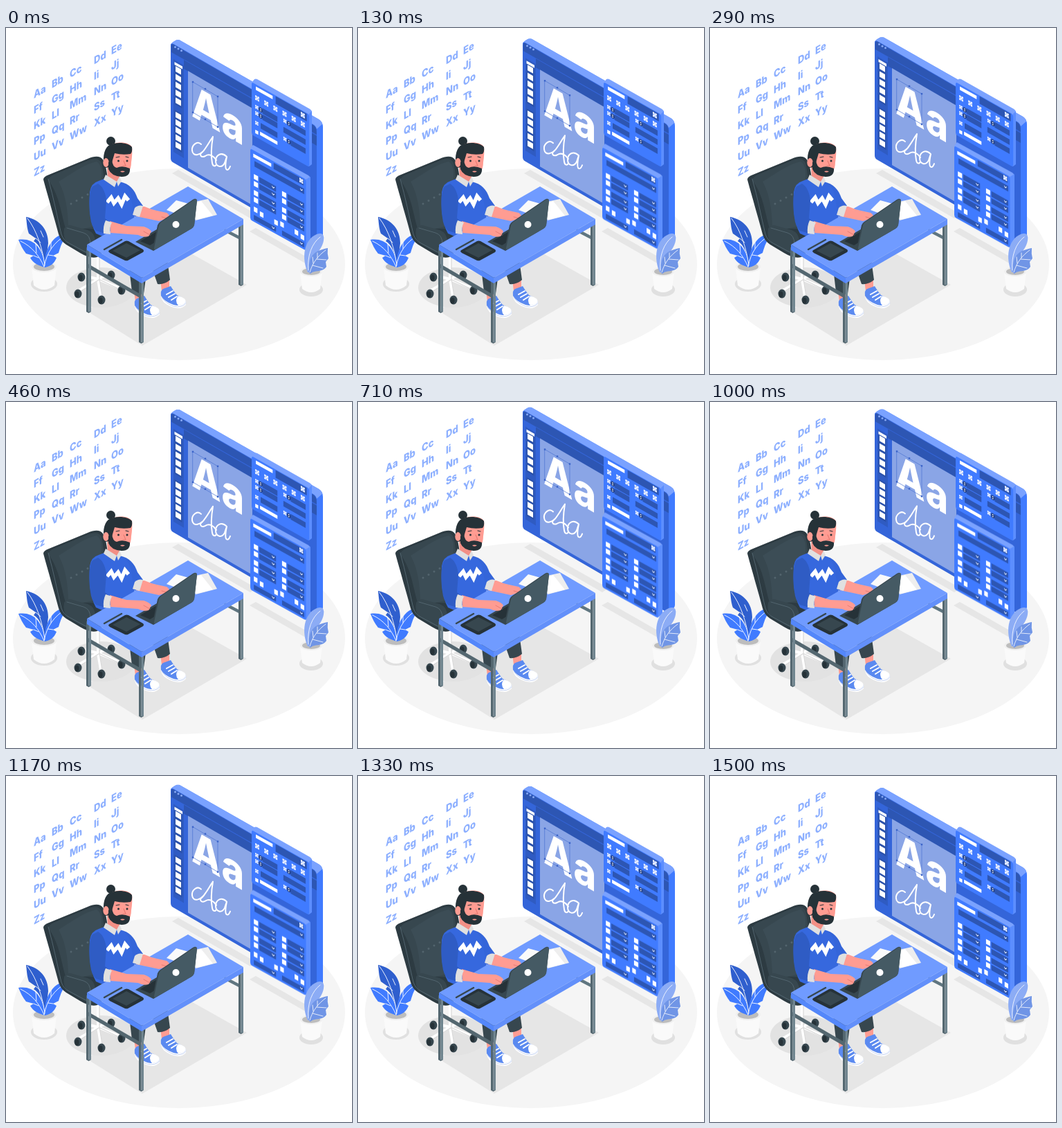
These frames come from a looping animation (500 px wide and 500 px high, 1540 ms). An HTML page:

```html
<!DOCTYPE html>
<html lang="en">
<head>
<meta charset="utf-8">
<title>Typeface designer at work</title>
<style>
html, body { margin: 0; width: 100%; height: 100%; overflow: hidden; background: #fff; }
svg { display: block; width: 100vw; height: 100vh; }
text { font-family: Inter, "Open Sans", sans-serif; font-weight: 800; }
.float { animation: float 1540ms linear infinite; }
@keyframes float {
  0%, 97.4%, 100% { transform: translateY(0); }
  48.7% { transform: translateY(-10px); }
}
.line { fill: none; stroke-linecap: round; stroke-linejoin: round; }
</style>
</head>
<body>
<svg viewBox="0 0 500 500">
  <!-- floor and shadows -->
  <ellipse cx="250" cy="341.500" rx="240" ry="138.500" fill="#f5f5f5"/>
  <g fill="#e6e6e6">
    <path d="M117 409L243 312 348 371 197 459Z"/>
    <ellipse cx="137" cy="375" rx="50" ry="29" fill="#e2e2e2"/>
    <path d="M240 210L249 205 362 269 353 275Z"/>
    <path d="M352 294L361 289 452 341 443 346Z"/>
    <ellipse cx="55" cy="370" rx="19" ry="11" fill="#e0e0e0"/>
    <ellipse cx="441" cy="378" rx="17" ry="10" fill="#e0e0e0"/>
  </g>

  <g id="alphabet" fill="#8cafff" font-size="15"></g>

  <!-- big screen -->
  <g class="float">
    <path d="M238 24Q239 21 247 17L250 17 452 132Q458 136 458 143V303Q458 308 449 313L436 300Z" fill="#407bff"/>
    <path d="M238 24Q239 21 247 17L250 17 452 132Q457 135 457 139L449 146 243 25Z" fill="#7aa2ff"/>
    <path d="M238 26Q238 21 242 23L445 140Q449 143 449 148V309Q449 315 444 312L241 194Q238 192 238 188Z" fill="#3465d9"/>
    <path d="M239 25Q239 22 242 24L445 141Q449 144 449 154L239 35Z" fill="#2d56b3"/>
    <path d="M257 46L449 156V170L257 59Z" fill="#2d56b3"/>
    <path d="M242 45L257 54V188L242 179Z" fill="#2f5bc2"/>
    <path d="M263 62L356 116V256L263 202Z" fill="#8aa5e6"/>
    <g id="dots" fill="#86a8f5"></g>
    <g id="tools"></g>
    <text transform="matrix(.866 .5 0 1 268 127)" font-size="64" letter-spacing="1" fill="#fff">Aa</text>
    <path class="line" d="M270 78L306 99V143L270 122Z" stroke="#4d74d2" stroke-width=".7"/>
    <g id="grips"></g>
    <g class="line" stroke="#fff" stroke-width="2">
      <path d="M282 168C276 162 268 170 269 177C270 187 282 184 288 174C293 167 296 161 299 157C297 169 296 185 298 195C299 201 303 200 304 197"/>
      <path d="M284 179C278 183 282 188 288 185C294 181 300 185 304 191"/>
      <path d="M319 186C311 178 303 184 303 192C303 201 312 203 316 195L319 186C317 196 316 205 320 205Q322 205 324 200"/>
    </g>
  </g>

  <!-- upper palette -->
  <path d="M355 79L359 74Q361 73 363 74L439 117Q442 119 442 121V196L437 200Z" fill="#7aa2ff"/>
  <path d="M438 124L442 120V197L438 200Z" fill="#5c8eff"/>
  <g id="upper" transform="matrix(.866 .488 0 1 355 78)"></g>

  <!-- lower palette -->
  <g class="float">
    <path d="M353 174L357 169 437 213Q440 215 440 218V316L433 321Z" fill="#7aa2ff"/>
    <path d="M433 219L440 215V316L433 321Z" fill="#5c8eff"/>
    <g id="lower" transform="matrix(.866 .48 0 1 353 174)"></g>
  </g>

  <!-- right plant -->
  <path d="M425 352L428 377Q441 387 454 377L457 352Z" fill="#fafafa"/>
  <ellipse cx="441" cy="352" rx="16" ry="7" fill="#f0f0f0"/>
  <ellipse cx="441" cy="352" rx="13" ry="5" fill="#bdbdbd"/>
  <path d="M436 353C427 333 430 306 449 298Q461 294 459 307C456 325 440 328 439 353Z" fill="#8cacf5"/>
  <path d="M438 354C436 329 445 322 465 318Q464 326 466 333L462 338 463 345C457 354 446 349 440 355Z" fill="#7095e6"/>
  <g class="line" stroke="#fff" stroke-width=".8">
    <path d="M437 350C435 329 442 311 454 302"/>
    <path d="M439 353C443 339 451 329 462 321M444 340L443 331M450 332L450 325M443 343L458 347M449 334L463 335"/>
  </g>

  <!-- left plant -->
  <path d="M37 345L40 372Q55 384 70 372L73 345Z" fill="#fafafa"/>
  <ellipse cx="55" cy="345" rx="18" ry="8" fill="#f0f0f0"/>
  <ellipse cx="55" cy="345" rx="15" ry="6" fill="#bdbdbd"/>
  <path d="M29 273C49 277 61 291 61 311L57 345C54 326 49 313 40 308L43 304 33 297C30 288 30 281 29 273Z" fill="#2f5fce"/>
  <path d="M18 306C39 303 53 316 57 346C48 344 39 340 35 332L40 329 29 326C24 320 21 313 18 306Z" fill="#407bff"/>
  <path d="M90 297C70 297 56 315 55 346C64 345 70 340 73 332L68 329 76 325C79 315 82 306 90 297Z" fill="#407bff"/>
  <g class="line" stroke="#fff" stroke-width=".9">
    <path d="M56 343C53 320 45 293 31 275M50 310L43 304M54 302L50 293"/>
    <path d="M55 345C48 329 38 316 21 308M47 332L40 329M44 325L43 312"/>
    <path d="M55 345C59 324 69 310 87 299M61 328L68 329M65 319L65 309"/>
  </g>

  <!-- chair -->
  <g class="line" stroke="#fff" stroke-width="4">
    <path d="M133 329V363L109 357M133 363L106 379M133 363L137 387M133 363L165 376M133 363L151 354"/>
  </g>
  <path class="line" d="M135 331V363L139 388M134 364L107 381M136 364L165 378" stroke="#d8d8d8" stroke-width="1.200"/>
  <g id="casters"></g>
  <path d="M54 219Q54 215 62 212L118 189Q134 182 140 190C145 198 146 212 148 224L158 306 132 331Q122 334 107 325L87 313Q79 308 76 298C70 275 61 245 54 219Z" fill="#2d3b42"/>
  <path d="M61 220Q62 215 69 212L120 191Q134 186 138 195C144 218 142 252 146 291L86 289C80 272 78 242 61 220Z" fill="#37474f"/>
  <path d="M76 222C93 212 112 197 131 193Q139 198 138 215L128 286Q104 294 90 286C89 264 87 242 76 222Z" fill="#3c4d56"/>
  <path d="M84 290Q88 283 97 286L118 292Q129 296 129 309V328Q119 328 106 321L88 310Q82 302 84 290Z" fill="#37474f"/>
  <path class="line" d="M61 218C69 246 74 273 80 298Q83 307 91 311L121 327M88 289L112 296Q122 299 122 312" stroke="#52656f" stroke-width="1"/>
  <g id="buttons" fill="#53656e"></g>

  <!-- legs and shoes -->
  <path d="M185 380H199V396H187ZM223 364H236V380H225Z" fill="#ff9c92"/>
  <path d="M178 347L202 362 199 384Q190 387 182 381Z" fill="#37474f"/>
  <path d="M211 347L233 335 237 364Q229 371 219 370Z" fill="#37474f"/>
  <g id="shoes"></g>

  <!-- torso -->
  <path d="M164 222C179 225 186 234 190 246L198 257 188 273 172 268Z" fill="#3465d9"/>
  <path d="M134 221Q147 214 164 222C176 227 180 235 181 247L186 275 151 306 130 297C121 281 120 258 121 237Q123 224 134 221Z" fill="#3668de"/>
  <path d="M146 252L152 245 156 253 162 246 167 255 172 243 177 249" fill="none" stroke="#fff" stroke-width="5.500"/>
  <path d="M146 202L164 207V219Q158 227 147 217Z" fill="#f28f85"/>
  <path d="M144 212L160 222 157 230 141 219ZM160 222L164 215 167 221 162 229Z" fill="#e0e0e0"/>

  <!-- head -->
  <circle cx="151.500" cy="163.500" r="6.500" fill="#263238"/>
  <path d="M143 181C143 166 174 160 182 172Q183 181 181 194C181 206 175 214 166 214Q149 212 145 200Z" fill="#ff9c92"/>
  <path d="M143 202C139 190 141 176 148 170C159 164 175 165 182 172Q183 179 180 182Q168 184 157 181L154 191 151 201Z" fill="#263238"/>
  <ellipse cx="144.500" cy="194.500" rx="4.200" ry="6.500" fill="#ff9c92"/>
  <path d="M148 194L153 190Q154 201 160 202Q168 198 179 203Q180 215 167 215Q152 214 148 204Z" fill="#263238"/>
  <path d="M165 207Q168 206 172 207Q168 210 165 207Z" fill="#ff9c92"/>
  <path class="line" d="M170 192L173 199 169 199" stroke="#e87b73" stroke-width="1.200"/>
  <path class="line" d="M159 187L164 186M173 186L177 187" stroke="#263238" stroke-width="1.200"/>
  <g fill="#263238"><circle cx="162.500" cy="192" r="1.500"/><circle cx="175" cy="192" r="1.500"/></g>

  <!-- desk -->
  <g>
    <path d="M315 289L338 301V306L315 294Z" fill="#607680"/>
    <path d="M119 341L195 385V391L119 347Z" fill="#546770"/>
    <g id="posts"></g>
    <path d="M117 313L263 229 343 276 196 361Z" fill="#709bff"/>
    <path d="M117 313L196 361V369L117 321Z" fill="#5487fa"/>
    <path d="M196 361L343 276V284L196 369Z" fill="#6390fa"/>
  </g>
  <path d="M232 263L246 249 275 257 256 272Z" fill="#fafafa"/>
  <path d="M264 253L292 247 305 270 274 278Z" fill="#eee"/>
  <path d="M257 259L282 250 299 271 276 277Z" fill="#fff"/>
  <path class="line" d="M142 320L167 306" stroke="#37474f" stroke-width="2.500"/>
  <path d="M148 323Q148 321 151 320L172 308Q174 307 177 308L198 320Q200 322 198 324L176 336Q173 337 170 335L150 325Z" fill="#263238"/>
  <path d="M154 322L174 311 194 321 174 332Z" fill="#37474f"/>

  <!-- laptop and arms -->
  <path d="M187 309L235 281 261 294 213 322Z" fill="#37474f"/>
  <path d="M194 308L230 287 243 293 208 314Z" fill="#263238"/>
  <path d="M190 258L200 258Q209 262 218 264L232 267Q238 270 234 275L221 279 188 272Z" fill="#ff9c92"/>
  <path d="M186 260Q191 255 198 257L193 273 183 270Z" fill="#e0e0e0"/>
  <path d="M150 279L174 286 199 287Q208 290 210 294L206 301Q198 303 191 299L151 296Z" fill="#ff9c92"/>
  <path class="line" d="M199 294L208 299M225 273L233 275" stroke="#e87b73" stroke-width="1"/>
  <path d="M125 229C119 237 120 262 122 274Q123 286 130 293L143 297 150 281 143 275 145 249Q143 231 133 225Z" fill="#2f5cc4"/>
  <path d="M144 278L153 281Q149 288 151 298L141 297Q140 286 144 278Z" fill="#e0e0e0"/>
  <path d="M219 285Q220 282 223 280L270 248Q275 245 276 249L272 285Q271 288 268 290L214 321Q211 322 212 319Z" fill="#37474f"/>
  <path d="M221 285Q222 282 225 280L272 248Q276 246 276 250L272 285Q271 288 268 290L216 320Q214 321 214 318Z" fill="#455a64"/>
  <circle cx="245.500" cy="284" r="5" fill="#fff"/>
</svg>
<script>
const $ = id => document.getElementById(id);
const rect = (x, y, w, h, fill) =>
  `<rect x="${x}" y="${y}" width="${w}" height="${h}" fill="${fill}"/>`;
const dot = (x, y, r, fill) => `<circle cx="${x}" cy="${y}" r="${r}"${fill ? ` fill="${fill}"` : ''}/>`;
const put = (id, parts) => { $(id).innerHTML = parts.join(''); };
const range = n => [...Array(n).keys()];

const dark = '#2d56b3', face = '#407bff', white = '#fff';

// Alphabet wall
const columns = [40, 66, 92, 127, 152];
put('alphabet', range(26).map(i => {
  const x = columns[i % 5];
  const y = 102 - (x - 40) * .565 + Math.floor(i / 5) * 22.6;
  const pair = String.fromCharCode(65 + i, 97 + i);
  return `<text transform="matrix(.866 -.5 0 1 ${x} ${y})">${pair}</text>`;
}));

// Screen chrome
put('dots', range(3).map(i => dot(244.5 + i * 4.5, 27.5 + i * 2.6, 1.5)));
const tool = y => `<path d="M245 ${y}l8 4.600v8l-8-4.600z" fill="#fff"/>`;
put('tools', [
  '<path d="M243.500 50l11 6.300v60l-11-6.300zM243.500 118l11 6.300v56l-11-6.300z" fill="#2b52ab"/>',
  '<path d="M243.500 49l11.500 6.600v4l-11.500-6.600z" fill="#fff"/>',
  ...range(5).map(i => tool(55 + i * 11.3)),
  ...range(5).map(i => tool(121 + i * 10.8))
]);
put('grips', [[270, 78], [288, 88], [306, 99], [270, 122], [306, 143], [288, 132]]
  .map(([x, y]) => rect(x - 1.2, y - 1.2, 2.4, 2.4, '#3a63c9')));

// Palette widgets, in panel coordinates
const check = (x, y, s = 6.5) => rect(x, y, s, s, '#a9c1fb') +
  range(9).filter(i => i % 2 == 0)
    .map(i => rect(x + i % 3 * s / 3, y + Math.floor(i / 3) * s / 3, s / 3, s / 3, white)).join('');
const field = (x, y, w, h = 8) => rect(x, y, w, h, dark) +
  `<path class="line" d="M${x + w - 6.5} ${y + h / 2 - 1}l1.800 1.800 1.800-1.800" stroke="#fff" stroke-width="1"/>`;
const stepper = (x, y) => check(x, y - 3, 5) + rect(x + 12, y - 4, 25, 8, dark) +
  dot(x + 9, y, 3.5, '#24438c') +
  `<path d="M${x + 7.5} ${y - .7}l1.500-1.700 1.500 1.700zm0 1.400l1.500 1.700 1.500-1.700z" fill="#fff"/>`;
const body = (w, h) => `<rect width="${w}" height="${h}" rx="3" fill="${face}"/>`;

put('upper', [
  body(96, 76),
  rect(7, 3, 28, 5, white),
  rect(40, 1, 52, 11, dark), check(82, 3),
  ...range(6).map(i => check(6 + i * 15.2, 16)),
  stepper(6, 33), stepper(6, 42), stepper(53, 30), stepper(53, 56),
  rect(15, 52, 28, 8, dark), check(6, 53, 5),
  rect(6, 66, 5, 5, white), rect(14, 65, 29, 5, white),
  rect(53, 39, 37, 8, dark)
]);

const rows = [34, 44, 57, 67];
put('lower', [
  body(93, 103),
  rect(5, 5, 30, 5, white),
  rect(39, 2, 50, 9, dark), check(82, 3, 6),
  field(7, 15, 83),
  ...rows.map(y => rect(6, y, 7, 7, white) + field(15, y, 28)),
  ...rows.map(y => rect(53, y + 2, 7, 7, white) + field(62, y + 2, 28)),
  ...[6, 16, 40, 50, 74, 84].map(x => rect(x, x % 4 ? 81 : 83, 6, 7, white)),
  field(6, 93, 37, 7), field(53, 93, 37, 7)
]);

// Furniture details
put('casters', [[109, 360], [104, 384], [138, 393], [167, 379], [152, 357]].map(([x, y]) =>
  `<ellipse cx="${x}" cy="${y}" rx="5.500" ry="6.500" fill="#37474f"/>` +
  `<ellipse cx="${x - 1.5}" cy="${y + 1}" rx="3" ry="4.500" fill="#263238"/>`));
put('buttons', range(4).map(i => dot(94 + i * 8, 254 - i * 4.5, 1.5)));
put('posts', [[116, 317, 410], [192, 364, 454], [336, 282, 371]].map(([x, y, end]) =>
  rect(x, y, 3.5, end - y, '#546770') + rect(x + 3.5, y, 3.5, end - y, '#70858f') +
  `<path d="M${x} ${end}h7l-3.500 2z" fill="#546770"/>`));

const shoe = (x, y) => `<g transform="translate(${x} ${y})">
  <path d="M0 15Q1 24 13 29Q28 36 36 27V22L2 12Z" fill="#fff"/>
  <path d="M0 14Q-1 6 3 4L14 0Q18 7 23 13Q34 17 36 23Q31 30 18 27Q4 22 0 14Z" fill="#5b8af0"/>
  <path d="M25 14Q36 17 36 23Q33 28 25 28Q19 21 25 14Z" fill="#fff"/>
  <path class="line" d="M8 12L17 7M11 16L20 11M15 20L23 15" stroke="#fff" stroke-width="2"/>
  <path class="line" d="M1 16Q5 24 18 29Q30 32 36 25" stroke="#b9c9ef" stroke-width=".8"/>
</g>`;
put('shoes', [shoe(186, 387), shoe(224, 373)]);
</script>
</body>
</html>
```
